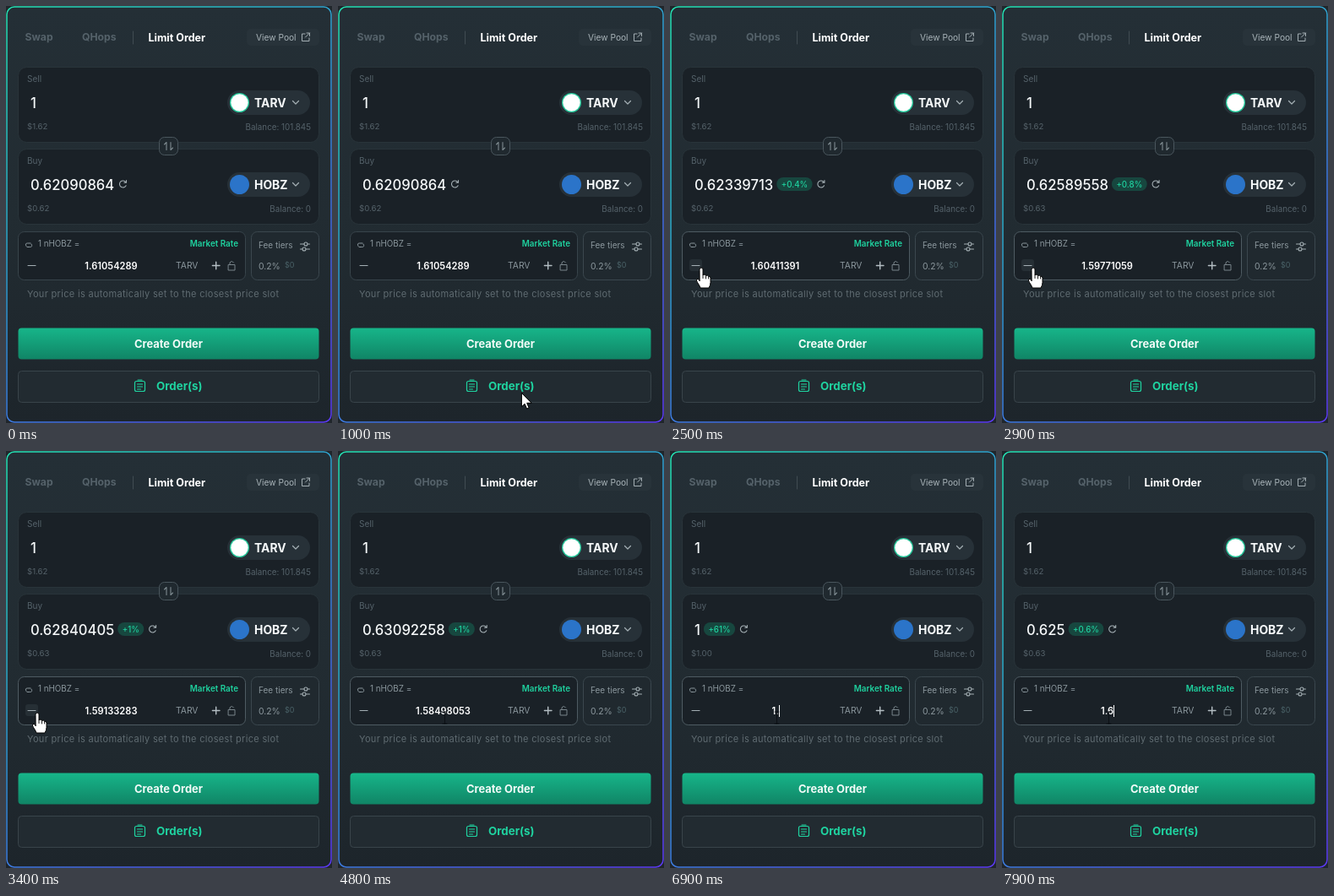
An HTML page with a canvas for the animation above (8000 ms loop, 386 px wide and 494 px high).

```html
<!DOCTYPE html>
<html lang="en">
<head>
<meta charset="utf-8">
<title>Limit order</title>
<style>
  html, body { margin: 0; width: 100%; height: 100%; overflow: hidden; background: #20262b; }
  canvas { display: block; width: 386px; height: 494px; }
</style>
</head>
<body>
<canvas id="stage"></canvas>
<script>
const W = 386, H = 494, LOOP = 8000, STEP = 100;
const LEFT = 14.5, WIDE = 356;
const canvas = document.getElementById('stage');
const c = canvas.getContext('2d');
const ratio = window.devicePixelRatio || 1;
canvas.width = W * ratio;
canvas.height = H * ratio;

const FONT = 'Inter, "Open Sans", sans-serif';
const WHITE = '#f6f9fa', MUTED = '#55626a', SOFT = '#8b979d', ICON = '#a4afb4', GREEN = '#1fd3a0';
const PANEL = '#1a2127', EDGE = '#29343a';
const SELL = { name: 'TARV', color: '#ffffff', ring: '#25c79a' };
const BUY = { name: 'HOBZ', color: '#2b74c9', ring: '#2b74c9' };

// Each click lowers the rate by one slot; then a new rate is typed over it
const MARKET = 1.61054289, SLOT = 1.0001 ** 40;
const CLICKS = [2500, 2900, 3300, 3800];
const SELECT_AT = 5300, TYPE_AT = 6500, KEY_GAP = 350, TYPED = '1.6';

function rateAt(t) {
  if (t >= TYPE_AT) return TYPED.slice(0, 1 + Math.floor((t - TYPE_AT) / KEY_GAP));
  return (MARKET / SLOT ** CLICKS.filter(k => k <= t).length).toFixed(8);
}

function gainOf(rate) {
  const gain = (MARKET / rate - 1) * 100;
  if (gain < 0.01) return '';
  return `+${gain < 1 ? Math.floor(gain * 10) / 10 : Math.floor(gain)}%`;
}

function ease(t, from, to) {
  const k = Math.min(1, Math.max(0, (t - from) / (to - from)));
  return k * k * (3 - 2 * k);
}

function pointerAt(t) {
  if (t < 800) return null;
  const enter = 1 - ease(t, 800, 1500), leave = ease(t, 4400, 4800);
  return { x: 37 + 225 * enter + 89 * leave, y: 310.5 + 185 * enter + 5.5 * leave };
}

function setFont(size, weight = 400, spacing = 0) {
  c.font = `${weight} ${size}px ${FONT}`;
  c.letterSpacing = spacing + 'px';
}

// y is the middle of the capitals
function text(s, x, y, size, color, { weight = 400, align = 'left', spacing = 0 } = {}) {
  setFont(size, weight, spacing);
  c.textAlign = align;
  c.fillStyle = color;
  c.fillText(s, x, y + size * 0.364);
  return c.measureText(s).width;
}

function box(x, y, w, h, r, fill, stroke, line = 1) {
  c.beginPath();
  c.roundRect(x, y, w, h, r);
  if (fill) { c.fillStyle = fill; c.fill(); }
  if (stroke) { c.strokeStyle = stroke; c.lineWidth = line; c.stroke(); }
}

function disc(x, y, r, fill) {
  c.beginPath();
  c.arc(x, y, r, 0, Math.PI * 2);
  c.fillStyle = fill;
  c.fill();
}

function icon(d, x, y, color = ICON, line = 1.1, fill) {
  const path = new Path2D(d);
  c.save();
  c.translate(x, y);
  c.lineCap = c.lineJoin = 'round';
  if (fill) { c.fillStyle = fill; c.fill(path); }
  c.strokeStyle = color;
  c.lineWidth = line;
  c.stroke(path);
  c.restore();
}

function ramp(x0, y0, x1, y1, ...colors) {
  const g = c.createLinearGradient(x0, y0, x1, y1);
  colors.forEach((k, i) => g.addColorStop(i / (colors.length - 1), k));
  return g;
}

function drawCard() {
  c.fillStyle = '#20262b';
  c.fillRect(0, 0, W, H);
  box(1, 1, W - 2, H - 2, 9, ramp(0, 0, 0, H, '#242f36', '#222c32', '#1d252b'),
    ramp(0, 0, W, H, '#24e2b2', '#338fd8', '#5c38f2'), 1.5);
}

function drawHeader() {
  text('Swap', 22.5, 37, 12.2, MUTED, { weight: 700 });
  text('QHops', 90, 37, 12.2, MUTED, { weight: 700 });
  icon('M0 0V15', 150.5, 30, '#414c52', 1);
  text('Limit Order', 168.5, 37, 12.5, '#ffffff', { weight: 700 });
  box(285, 27, 86, 20, 5, '#28333a');
  text('View Pool', 296, 37, 10.2, '#a9b4b9');
  icon('M4 1H.5V9.5H9V6M6 0H9.5V3.5M9.5 0L4.5 5', 350, 32, ICON, 1);
}

function drawToken(y, token) {
  box(262, y - 14.5, 98, 29, 14.5, '#273138');
  disc(276.5, y, 11.5, token.ring);
  disc(276.5, y, 10.2, token.color);
  text(token.name, 294, y, 13.9, WHITE, { weight: 700 });
  icon('M-3.5 -1.5L0 2L3.5 -1.5', 343, y - 0.5, ICON, 1.2);
}

function drawPanel(y, label, amount, usd, balance, token) {
  box(LEFT, y + 0.5, WIDE, 89, 10, PANEL, EDGE);
  text(label, 25, y + 14.5, 10, MUTED);
  const width = text(amount, 29, y + 42.5, 16.6, WHITE, { weight: 500 });
  text('$' + usd, 25, y + 71, 9.6, MUTED);
  text('Balance: ' + balance, 361, y + 71, 9.8, MUTED, { align: 'right' });
  drawToken(y + 42.5, token);
  return 29 + width;
}

function drawGain(gain, x, y) {
  if (gain) {
    setFont(9.7, 500);
    const w = c.measureText(gain).width + 11;
    box(x + 4, y - 8, w, 16, 8, '#17473f');
    text(gain, x + 9.5, y, 9.7, GREEN, { weight: 500 });
    x += w + 4;
  }
  icon('M3.6 1.7A4 4 0 1 1 3.2 -2.4M4 -4.4V-1.7H1.4', x + 10.3, y);
}

function drawSwap() {
  box(181.5, 155.5, 22, 21, 6, '#20292f', '#4a565d');
  icon('M-2.5 4.5V-4.5L-5 -2M2.5 -4.5V4.5L5 2', 192.5, 166, '#7f8b91');
}

function drawPrice(rate, active, hover, selected, caret) {
  const mid = 124.5;
  box(LEFT, 267.5, 269, 57, 7, PANEL, active ? '#4e5b62' : '#38444b');
  icon('M1 3.5Q-1 0 2.5 0H6M7 1Q9 4.5 5.5 4.5H2', 23, 281, SOFT, 1);
  text(`1 n${BUY.name} =`, 38, 281.5, 9.8, SOFT);
  text('Market Rate', 275, 281.5, 9.9, GREEN, { weight: 600, align: 'right' });

  if (hover) box(23, 300, 15, 14, 3, '#262f35');
  icon('M0 0H9', 26, 307.5, ICON, 1.1);
  setFont(11.1, 600);
  const half = c.measureText(rate).width / 2;
  if (selected) {
    c.fillStyle = '#1b67cb';
    c.fillRect(mid - half - 1, 299, half * 2 + 2, 17);
  }
  text(rate, mid, 308, 11.1, '#ffffff', { weight: 600, align: 'center' });
  if (caret) {
    c.fillStyle = '#ffffff';
    c.fillRect(Math.round(mid + half), 301, 1, 14);
  }
  text(SELL.name, 201, 307, 10.3, SOFT);
  icon('M-4.3 0H4.3M0 -4.3V4.3', 248.7, 307.5, '#b4bec3', 1.4);
  icon('M0 4H7.5V10.5H0ZM1.5 4V1.5Q3.7 -1.5 6 1.5', 263.5, 302.5, '#78848a', 1);
}

function drawFees() {
  box(290.5, 267.5, 80, 57, 7, '#20292f', '#3b474e');
  text('Fee tiers', 299, 283.5, 10, SOFT);
  text('0.2%', 299, 308, 10.4, SOFT);
  text('$0', 330, 307, 9, '#4a6268');
  const slider = 'M0 0H4.5M8.5 0H11M4.5 0a2 2 0 1 0 4 0a2 2 0 1 0 -4 0';
  icon(slider, 348.5, 282);
  c.save();
  c.scale(-1, 1);
  icon(slider, -359.5, 288);
  c.restore();
}

function drawFooter() {
  text('Your price is automatically set to the closest price slot', 25, 341, 11, '#5f6b71', { spacing: 0.32 });
  box(LEFT, 381.5, WIDE, 37, 4, ramp(0, 381, 0, 419, '#17b68a', '#108465'));
  text('Create Order', 192.5, 400, 12.9, '#f2fbf8', { weight: 700, align: 'center' });
  box(LEFT, 432.5, WIDE, 37, 4, '#222b31', '#39444a');
  box(152.5, 444.5, 12, 12, 2, null, GREEN, 1.2);
  icon('M0 0H6M0 3H6M0 6H4M.5 -5H5.5', 155.5, 448, GREEN, 1.2);
  text('Order(s)', 178, 450.5, 13.3, GREEN, { weight: 700 });
}

function drawPointer({ x, y }, hover, beam) {
  if (hover) {
    icon('M-2 1.5Q-2 -.5 0 -.5T2 1.5V8Q4.5 6.8 5.5 8.8Q8 8 8.6 9.8Q11 9 11 12V17Q11 20 9 23.5H-1Q-2 20.5 -4.5 17Q-6.5 14 -5 13T-2 15Z',
      x, y, '#000000', 1, '#ffffff');
    icon('M2 8V12M5.5 9V12.5M8.6 10V12.5', x, y, '#000000', 0.9);
  } else if (beam) {
    icon('M-2 -7H3M.5 -7V7M-2 7H3', x, y, '#0b0f12', 0.9);
  } else {
    icon('M0 0V16L3.7 12.5L6.2 18.3L8.7 17.2L6.3 11.5H11.4Z', x, y, '#000000', 1, '#ffffff');
  }
}

function draw(t) {
  const rate = rateAt(t);
  const bought = (1 / rate).toFixed(8).replace(/\.?0+$/, '');
  const pointer = pointerAt(t);
  const active = !!pointer && pointer.y < 325;
  const hover = active && pointer.x < 41;

  c.setTransform(ratio, 0, 0, ratio, 0, 0);
  drawCard();
  drawHeader();
  drawPanel(72, 'Sell', '1', '1.62', '101.845', SELL);
  const end = drawPanel(169, 'Buy', bought, Number(bought).toFixed(2), '0', BUY);
  drawGain(gainOf(rate), end, 211);
  drawSwap();
  drawPrice(rate, active, hover, t >= SELECT_AT && t < TYPE_AT, t >= TYPE_AT);
  drawFees();
  drawFooter();
  if (pointer) drawPointer(pointer, hover, t > 4400 && pointer.x > 60);
}

const start = performance.now();
function tick() {
  const t = (performance.now() - start) % LOOP;
  draw(Math.floor(t / STEP) * STEP);
  requestAnimationFrame(tick);
}
tick();
</script>
</body>
</html>
```
